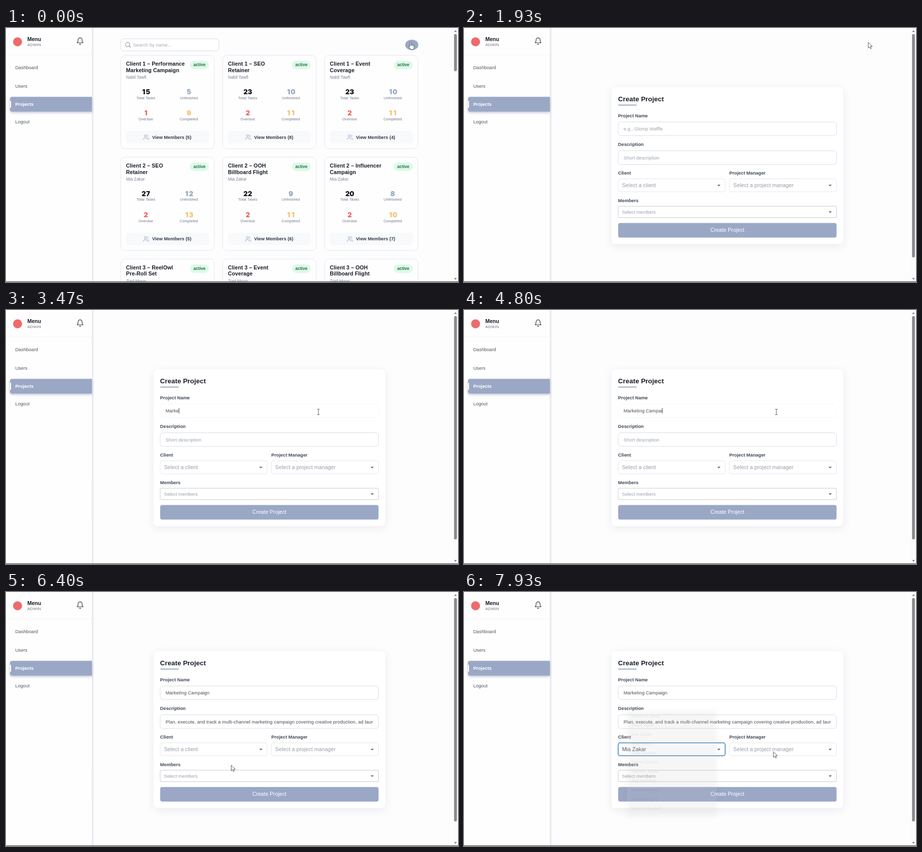
These frames come from a looping animation (900x506 px, 8000 ms). An HTML page with a canvas:

```html
<!DOCTYPE html>
<html lang="en">
<head>
<meta charset="utf-8">
<title>Project dashboard</title>
<style>
html, body { margin: 0; width: 100%; height: 100%; overflow: hidden; background: #fdfdfe; }
canvas { display: block; width: 900px; height: 506px; }
</style>
</head>
<body>
<canvas id="stage" width="900" height="506"></canvas>
<script>
const ctx = document.getElementById('stage').getContext('2d');
const LOOP = 8000;
const SANS = '"Liberation Sans", Arial, sans-serif';
const BLUE = '#9aa8c6', INK = '#171b26', LABEL = '#414a58', HINT = '#9aa0aa', BODY = '#50555e';

const T = { form: 1930, nameFocus: 2200, descFocus: 5130, paste: 5800, descBlur: 6090,
            hover: 6530, open: 6780, pick: 7717 };

const PEOPLE = ['Nabil Tawfi', 'Mia Zakar', 'Ziad Moun', 'Lina Qortam', 'Samer Doubi',
  'Yasmin Toufa', 'Jad Wehdan', 'Dana Mokhlis', 'Bassam Oud', 'Hala Zeitouneh'];
const MENU = ['Select a client', ...PEOPLE];
const NAME = 'Marketing Campaign';
const DESC = 'Plan, execute, and track a multi-channel marketing campaign covering creative production, ad launches';
const KEYS = [3000, 3130, 3200, 3330, 3470, 3600, 3670, 3770, 3870, 4000,
  4270, 4370, 4470, 4600, 4670, 4790, 4870, 4970];

// title lines, total, unfinished, overdue, completed, members
const CARDS = [
  ['Performance', 'Marketing Campaign', 15, 5, 1, 9, 5],
  ['SEO', 'Retainer', 23, 10, 2, 11, 8],
  ['Event', 'Coverage', 23, 10, 2, 11, 4],
  ['SEO', 'Retainer', 27, 12, 2, 13, 5],
  ['OOH', 'Billboard Flight', 22, 9, 2, 11, 6],
  ['Influencer', 'Campaign', 20, 8, 2, 10, 7],
  ['ReelOwl', 'Pre-Roll Set', 21, 8, 2, 11, 5],
  ['Event', 'Coverage', 22, 9, 2, 11, 6],
  ['OOH', 'Billboard Flight', 20, 8, 2, 10, 4]
];

// time, x, y, pointer shape until the next key
const PATH = [
  [0, 805.5, 28.5, 'hand'], [1930, 805, 28.5, 'arrow'], [1990, 805, 28.5, 'arrow'],
  [2200, 622, 203, 'beam'], [4930, 622, 203, 'beam'], [5070, 641, 258, 'beam'],
  [5800, 641, 258, 'beam'], [5900, 745, 276, 'arrow'], [6030, 828, 288, 'arrow'],
  [6130, 828, 288, 'arrow'], [6400, 448.5, 345, 'arrow'], [6550, 452, 315, 'hand'],
  [6830, 452, 315, 'hand'], [7110, 435.5, 321, 'hand'], [7150, 435.5, 321, 'hand'],
  [7500, 430, 264, 'hand'], [7730, 430, 264, 'arrow'], [7930, 616, 318, 'arrow'], [8000, 616, 318, 'arrow']
];

const clamp = v => Math.max(0, Math.min(1, v));
const lerp = (a, b, k) => a + (b - a) * k;
const span = (t, start, len) => clamp((t - start) / len);

// cubic-bezier(.4, 0, .2, 1)
function ease(x) {
  let lo = 0, hi = 1;
  for (let i = 0; i < 20; i++) {
    const u = (lo + hi) / 2, v = 1 - u;
    if (1.2 * v * v * u + 0.6 * v * u * u + u * u * u < x) lo = u; else hi = u;
  }
  return 3 * (1 - lo) * lo * lo + lo ** 3;
}

function text(s, x, y, size, color, { bold, gap = 0, align = 'left' } = {}) {
  ctx.font = `${bold ? 'bold ' : ''}${size}px ${SANS}`;
  ctx.letterSpacing = gap + 'px';
  ctx.textAlign = align;
  ctx.fillStyle = color;
  ctx.fillText(s, x, y);
}

function box(x, y, w, h, r, fill, stroke, width = 0.9, shadow) {
  ctx.beginPath();
  ctx.roundRect(x, y, w, h, r);
  if (fill) {
    ctx.save();
    if (shadow) [ctx.shadowColor, ctx.shadowBlur, ctx.shadowOffsetY] = shadow;
    ctx.fillStyle = fill;
    ctx.fill();
    ctx.restore();
  }
  if (stroke) {
    ctx.lineWidth = width;
    ctx.strokeStyle = stroke;
    ctx.stroke();
  }
}

function poly(points, fill) {
  ctx.beginPath();
  points.forEach(([x, y]) => ctx.lineTo(x, y));
  ctx.closePath();
  ctx.fillStyle = fill;
  ctx.fill();
}

function icon(path, x, y, scale, color, width) {
  ctx.save();
  ctx.translate(x, y);
  ctx.scale(scale, scale);
  ctx.translate(-12, -12);
  ctx.lineCap = ctx.lineJoin = 'round';
  ctx.lineWidth = width;
  ctx.strokeStyle = color;
  ctx.stroke(path);
  ctx.restore();
}

const BELL = new Path2D('M6 8a6 6 0 0 1 12 0c0 7 3 9 3 9H3s3-2 3-9M10.3 21a1.94 1.94 0 0 0 3.4 0');
const LENS = new Path2D('M19 11a8 8 0 1 1-16 0a8 8 0 1 1 16 0M21 21l-4.3-4.3');
const USERS = new Path2D('M16 21v-2a4 4 0 0 0-4-4H6a4 4 0 0 0-4 4v2M13 7a4 4 0 1 1-8 0a4 4 0 1 1 8 0M22 21v-2a4 4 0 0 0-3-3.87M16 3.13a4 4 0 0 1 0 7.75');
const ARROW = new Path2D('M0 0V11.2L2.6 8.8L4.4 12.8L6.2 12L4.5 8.1H8Z');
const HAND = new Path2D('M-1.2 8V1a1.2 1.2 0 0 1 2.4 0v4.2c.3-.9 2-.8 2.2.2.5-.8 2-.5 2 .5.6-.5 1.6-.2 1.6.9v3.2c0 1.6-1 2.3-1.2 4.5h-5.5c-.3-1.7-1.8-2.8-2.8-4.6-1.2-2-.9-2.5-.3-2.8.7-.3 1.2.3 1.6.9z');
const BEAM = new Path2D('M-2.5-5.5H-.8L0-5L.8-5.5H2.5M0-5V5M-2.5 5.5H-.8L0 5L.8 5.5H2.5');

function sidebar() {
  ctx.fillStyle = '#fefefe';
  ctx.fillRect(0, 0, 171, 506);
  const edge = ctx.createLinearGradient(170.5, 0, 176, 0);
  edge.addColorStop(0, '#d9dbe1');
  edge.addColorStop(0.3, '#e9eaee');
  edge.addColorStop(1, '#fdfdfe');
  ctx.fillStyle = edge;
  ctx.fillRect(171, 0, 5, 506);
  ctx.fillStyle = '#f5f5f8';
  ctx.fillRect(0, 53, 171, 1);

  ctx.beginPath();
  ctx.arc(23, 27.5, 9, 0, 7);
  ctx.fillStyle = '#ee6a6c';
  ctx.fill();
  text('Menu', 42.4, 25.6, 10.6, INK, { bold: true });
  text('ADMIN', 42.4, 36.2, 7.95, '#6b7280', { gap: 0.4 });
  icon(BELL, 147.5, 26.2, 0.66, '#2f3540', 1.8);

  text('Dashboard', 18.4, 82.3, 9.28, BODY);
  text('Users', 18.4, 118.5, 9.28, BODY);
  box(8, 137.3, 163, 29.2, [4, 0, 0, 4], BLUE, null, 0, ['rgba(110,125,165,.45)', 5, 2]);
  box(8, 145, 2, 14, [0, 1, 1, 0], '#fff');
  text('Projects', 18.4, 154.9, 9.28, '#fff', { bold: true });
  text('Logout', 18.4, 189.7, 9.28, BODY);
}

function scrollbar(bottom) {
  ctx.fillStyle = '#fbfbfc';
  ctx.fillRect(890, 0, 10, 505);
  box(892.2, 12, 5.6, bottom - 12, 2.8, '#898a8c');
  poly([[892.3, 8], [895, 4.3], [897.7, 8]], '#858688');
  poly([[892.3, 498], [895, 501.7], [897.7, 498]], '#858688');
}

function stat(value, label, x, y, color) {
  const digits = String(value), cell = 8.7;
  ctx.font = '900 13.2px Inter, "Liberation Sans", sans-serif';
  ctx.letterSpacing = '0px';
  ctx.textAlign = 'center';
  ctx.fillStyle = color;
  [...digits].forEach((d, i) => ctx.fillText(d, x + (i - (digits.length - 1) / 2) * cell, y));
  text(label, x, y + 9.8, 7.42, '#6f7683', { gap: 0.1, align: 'center' });
}

function card([head, tail, total, open, late, done, members], i) {
  const row = Math.floor(i / 3);
  const x = 228.4 + (i % 3) * 202.9, y = 54.4 + row * 202.85;
  const title = { bold: true, gap: 0.1 };
  box(x, y, 186.3, 186, 9, '#fefeff', '#e3e5ec');
  text(`Client ${row + 1} – ${head}`, x + 10.6, y + 20.7, 10.6, INK, title);
  text(tail, x + 10.6, y + 33.3, 10.6, INK, title);
  text(PEOPLE[row], x + 10.6, y + 46.6, 8.4, '#7b8290');
  box(x + 138, y + 10.8, 37.6, 17, 8.5, '#dcfae8');
  text('active', x + 156.8, y + 22, 8.48, '#2d6a4b', { bold: true, align: 'center' });
  stat(total, 'Total Tasks', x + 50.1, y + 77.3, '#10131c');
  stat(open, 'Unfinished', x + 135.8, y + 77.3, '#95a4c5');
  stat(late, 'Overdue', x + 50.1, y + 119.5, '#ec6460');
  stat(done, 'Completed', x + 135.8, y + 119.5, '#f6c16c');
  box(x + 10.6, y + 150.5, 165.3, 25, 6, '#f8f9fb');
  icon(USERS, x + 50.8, y + 163, 0.53, '#95a4c5', 1.8);
  text(`View Members (${members})`, x + 62.6, y + 166.2, 9.28, '#333c4b', { bold: true });
}

function list() {
  box(228.4, 21.5, 195.6, 24.3, 6, '#fff', '#d5d8df');
  icon(LENS, 242.8, 33.6, 0.53, '#7d8592', 2);
  text('Search by name...', 253, 37, 9.28, '#a3a8b1', { gap: 0.1 });
  box(795, 23.3, 26, 20.8, [{ x: 13, y: 10.4 }], BLUE);
  CARDS.forEach(card);
}

function grey(k) {
  const mix = (a, b) => Math.round(lerp(a, b, k));
  return `rgb(${mix(214, 245)},${mix(217, 246)},${mix(224, 249)})`;
}

function field(y, value, hint, focus, caret) {
  box(307, y, 434.7, 27.3, 5.5, '#fff', grey(focus));
  ctx.save();
  ctx.beginPath();
  ctx.rect(317, y, 413.8, 27);
  ctx.clip();
  text(value || hint, 317.8, y + 17.1, 9.28, value ? '#454a53' : HINT, { gap: 0.1 });
  if (caret) {
    const x = value ? 317.8 + ctx.measureText(value).width : 318;
    ctx.fillStyle = '#333';
    ctx.fillRect(Math.min(x, 729.5), y + 8.2, 0.9, 10.8);
  }
  ctx.restore();
}

function select(x, y, w, h, r, border, width, label, color, size, gap) {
  box(x, y, w, h, r, '#fff', border, width);
  text(label, x + 7.7, y + h / 2 + 3.4, size, color, { gap });
  const ax = x + w - 12.5, ay = y + h / 2 - 1.2;
  poly([[ax - 3.2, ay], [ax + 3.2, ay], [ax, ay + 3.3]], '#66696f');
}

function form(t) {
  const bold = { bold: true };
  box(294, 118, 461, 312.5, 8, '#fff', null, 0, ['rgba(40,50,80,.09)', 18, 4]);
  text('Create Project', 306.8, 145.6, 13.25, INK, { bold: true, gap: 0.1 });
  box(307, 152.6, 37, 2, 1, BLUE);

  const typed = KEYS.filter(k => k <= t).length;
  const last = typed ? KEYS[typed - 1] : T.nameFocus;
  const inName = t >= T.nameFocus && t < T.descFocus;
  const inDesc = t >= T.descFocus && t < T.descBlur;
  const blink = from => (t - from) % 1060 < 530;
  const glow = (on, off) => ease(span(t, on, 260)) - ease(span(t, off, 260));

  text('Project Name', 306.8, 177.7, 9.28, LABEL, bold);
  field(187.1, NAME.slice(0, typed), 'e.g., Glomp Waffle', glow(T.nameFocus, T.descFocus), inName && blink(last));
  text('Description', 306.8, 235.1, 9.28, LABEL, bold);
  field(244.5, t >= T.paste ? DESC : '', 'Short description', glow(T.descFocus, T.descBlur),
    inDesc && blink(t >= T.paste ? T.paste : T.descFocus));

  const picked = t >= T.pick, hover = t >= T.hover;
  text('Client', 306.8, 292.3, 9.28, LABEL, bold);
  select(307, 300.5, 213, 25.8, 4, picked ? '#3a7fb5' : hover ? BLUE : '#e3e5eb', picked ? 1.5 : 0.9,
    picked ? PEOPLE[1] : MENU[0], picked ? '#50555d' : '#969ca6', 10.6, 0.1);
  text('Project Manager', 528.3, 292.3, 9.28, LABEL, bold);
  select(528.4, 300.5, 213.2, 25.8, 4, '#e3e5eb', 0.9, 'Select a project manager', '#969ca6', 10.6, 0.1);
  text('Members', 306.8, 347, 9.28, LABEL, bold);
  select(307, 355, 434.7, 22.8, 2.7, '#c3c5ca', 0.9, 'Select members', HINT, 9.28, 0);
  box(307, 388.6, 434.8, 28.8, 4, BLUE);
  text('Create Project', 524.4, 406.3, 10.6, '#fff', { align: 'center' });
}

function menu(t, pointerY) {
  const closing = t >= T.pick, len = 347, move = 231;
  const fade = closing ? 1 - ease(span(t, T.pick, len)) : ease(span(t, T.open, len));
  const grow = closing ? 1 - ease(span(t, T.pick + len - move, move)) : ease(span(t, T.open, move));
  const k = 0.75 + 0.25 * grow, rowH = 26.35, top = 200;
  ctx.save();
  ctx.globalAlpha = fade;
  ctx.translate(413.7, 325);
  ctx.scale(k, k * k);
  ctx.translate(-413.7, -325);
  box(307, 194.7, 213.4, 300.3, 2.7, '#fff', null, 0, ['rgba(0,0,0,.36)', 9, 3]);
  const over = closing ? 2 : Math.floor((pointerY - top) / rowH);
  MENU.forEach((label, i) => {
    const y = top + i * rowH;
    const tint = i === 0 && !closing ? '#ebf3fb' : i === over ? '#f4f3f5' : null;
    if (tint) {
      ctx.fillStyle = tint;
      ctx.fillRect(307, y, 213.4, rowH);
    }
    text(label, 317.6, y + 16.9, 10.6, '#4b4d51', { gap: 0.1 });
  });
  ctx.restore();
}

function pointerAt(t) {
  let i = PATH.length - 2;
  while (PATH[i][0] > t) i--;
  const [t0, x0, y0, shape] = PATH[i], [t1, x1, y1] = PATH[i + 1];
  const u = clamp((t - t0) / (t1 - t0)), k = u * u * (3 - 2 * u);
  return { x: lerp(x0, x1, k), y: lerp(y0, y1, k), shape };
}

function pointer({ x, y, shape }) {
  ctx.save();
  ctx.translate(x, y);
  ctx.lineJoin = 'round';
  ctx.strokeStyle = '#3b3d42';
  ctx.lineWidth = 0.85;
  if (shape === 'beam') {
    ctx.stroke(BEAM);
  } else {
    const path = shape === 'hand' ? HAND : ARROW;
    ctx.fillStyle = '#fff';
    ctx.fill(path);
    ctx.stroke(path);
    if (shape === 'hand') {
      ctx.lineWidth = 0.6;
      ctx.stroke(new Path2D('M1.2 5V7.5M3.4 5.6V7.7M5.4 6V8'));
    }
  }
  ctx.restore();
}

function draw(t) {
  const p = pointerAt(t);
  ctx.fillStyle = '#fdfdfe';
  ctx.fillRect(0, 0, 900, 506);
  if (t < T.form) list(); else form(t);
  sidebar();
  if (t < T.open || t >= T.pick) scrollbar(t < T.form ? 86 : 457);
  if (t >= T.open) menu(t, p.y);
  ctx.fillStyle = '#56585c';
  ctx.fillRect(0, 504.8, 900, 1.2);
  pointer(p);
}

const start = performance.now();
function tick() {
  draw((performance.now() - start) % LOOP);
  requestAnimationFrame(tick);
}
tick();
</script>
</body>
</html>
```
